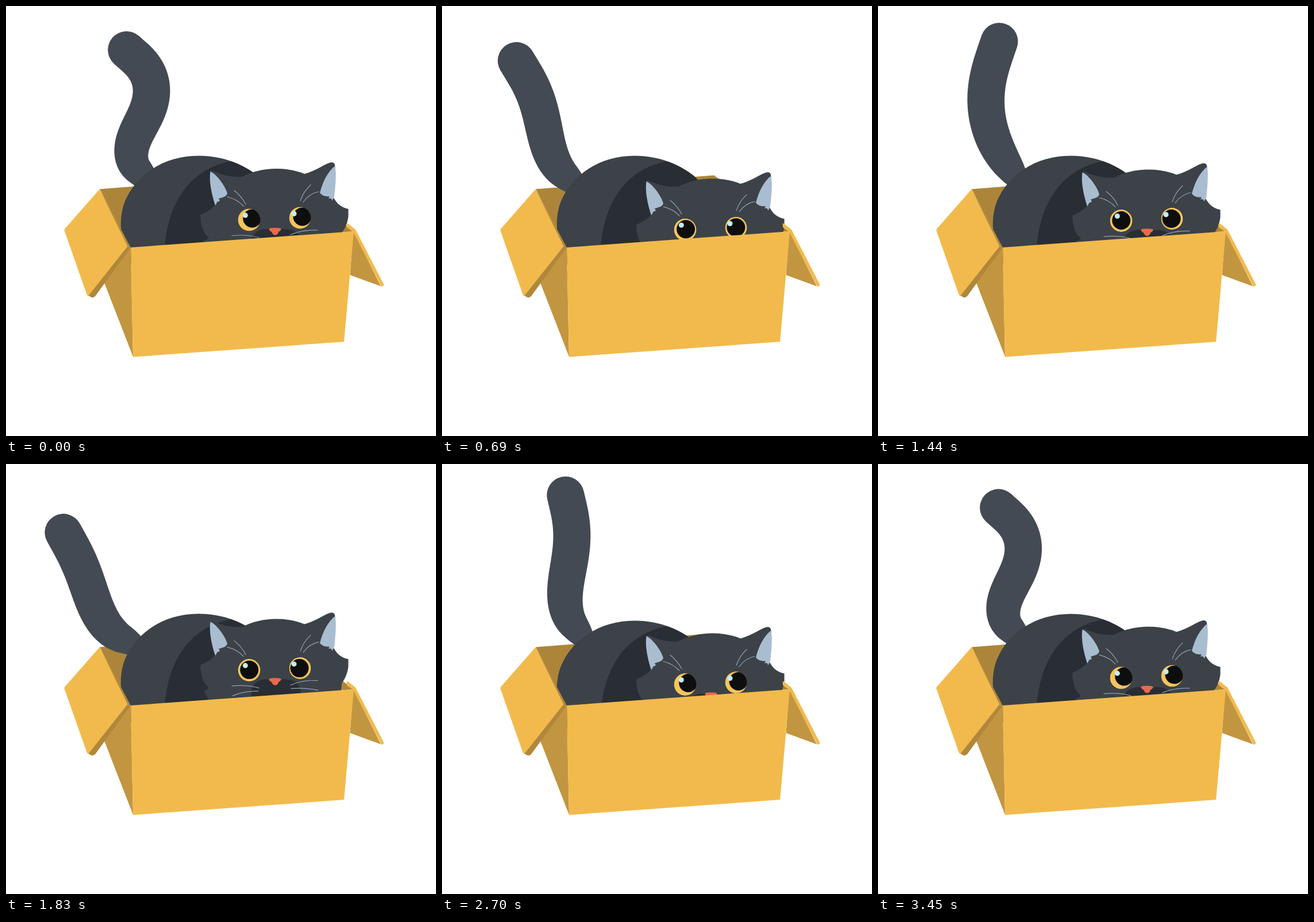
Recreate the animation shown at these times as an HTML page. Size 748 by 748 pixels, loop 3.48 s.

```html
<!DOCTYPE html>
<html lang="en">
<head>
<meta charset="utf-8">
<title>Cat in a box</title>
<style>
html, body { margin: 0; width: 100%; height: 100%; overflow: hidden; background: #fff; }
svg { display: block; width: 100vw; height: 100vh; }
.line { fill: none; stroke: #8fa3b1; stroke-width: 1.2; stroke-linecap: round; }
.fur { fill: #3c4247; }
.dark { fill: #292d34; }
.card { fill: #f2ba4c; }
.shade { fill: #c29540; }
.ear { fill: #a9bdd1; }
</style>
</head>
<body>
<svg viewBox="0 0 748 748">
  <defs>
    <path id="torso" d="M212 450C198 405 194 362 211 331C233 288 280 260.500 335 260.500C380 260.500 416 277 441 298L480 345V450Z"/>
    <clipPath id="inTorso"><use href="#torso"/></clipPath>
    <clipPath id="inEyeL"><circle cx="423" cy="372" r="19.500"/></clipPath>
    <clipPath id="inEyeR"><circle cx="511.500" cy="368.500" r="19"/></clipPath>
  </defs>

  <path fill="#ad853a" d="M163 318.500L473 294.500L605 392L217 421Z"/>
  <path id="tail" fill="#444a53"/>

  <g id="body">
    <use href="#torso" class="fur"/>
    <path class="dark" clip-path="url(#inTorso)" d="M275 440C276 354 312 285 392 270L500 260V440Z"/>
  </g>

  <g id="head">
    <path class="fur" d="M355 290Q355 285 360 287C378 295 393 298 411 297C428 288 448 283 470 283C489 283 505 286 519 292C536 288 549 278 562 273Q570 270 572 276C575 293 572 309 568 329C574 343 582 350 595.500 353V366C594 378 590 387 584 395L580 440H362Q350 420 344 408Q350 407 353 403C343 396 338 380 338 363Q354 357 364 346C358 330 354 308 355 290Z"/>
    <path class="ear" d="M355.500 288C364 291 381 311 385 326C383 332 377 333 370 335Q374 341 368 340L364 347C357 325 353 304 355.500 288Z"/>
    <path class="ear" d="M572.500 278C575 295 573 314 571 332L567 339Q567 333 561 335L563 331C555 332 549 329 546 325C551 305 560 288 572.500 278Z"/>
    <path class="line" d="M397 321Q410 331 417 345M385 332Q402 336 413 348M530 311Q517 323 512 339M544 323Q528 326 517 341"/>
    <path class="dark" d="M427 412C425 398 438 388 453 388Q461 388 468 391Q476 388 485 388C502 388 514 397 512 412V435H427Z"/>
    <path fill="#e9694b" d="M459 386.500Q468 385 477 386.500Q480 388 477 391L474 393Q473 398 468 398.500Q464 398 462 393L459 391Q456 388 459 386.500Z"/>
    <path class="line" d="M393 399.500Q420 397 440 403M394 416.500Q415 408 439 408.500M495 398Q515 389 542 390M496 404Q520 402 543 407"/>
    <g clip-path="url(#inEyeL)">
      <circle cx="423" cy="372" r="19.500" fill="#f6c45c"/>
      <circle class="pupil" cx="423.200" cy="371.500" r="16" fill="#0e0e0f"/>
    </g>
    <g clip-path="url(#inEyeR)">
      <circle cx="511.500" cy="368.500" r="19" fill="#f6c45c"/>
      <circle class="pupil" cx="510.500" cy="368.500" r="16" fill="#0e0e0f"/>
    </g>
    <g fill="#c3eef6">
      <circle cx="416.300" cy="364" r="4.500"/>
      <circle cx="501" cy="361.300" r="4.500"/>
    </g>
  </g>

  <path class="shade" d="M604 391L652 487.500L598.500 468Z"/>
  <path class="card" d="M592.500 379Q594 377 597 380L608 389L657 484Q658 488 653 488L604 393L593 385Z"/>
  <path class="shade" d="M217 420L200 410L165 466L221 610Z"/>
  <path class="card" d="M217 420L605 392L588 584L221 610.500Z"/>
  <path fill="#b0873b" d="M163 318.500L217 420L155 505Q152 508 148 506.500L142 503L205 410Z"/>
  <path class="card" d="M163 318.500L102 388Q101 390 102 392L140 500Q141 503 143 504.500L211.500 418Z"/>
</svg>
<script>
const LOOP = 3480, STEP = 30;
const $ = id => document.getElementById(id);
const pupils = document.querySelectorAll('.pupil');

// Tail poses in degrees: lean, curl, bend, wave (polynomial orders 0 to 3)
const curled = [13.6, 5.3, 15.9, -7.6];
const curledFar = [11.2, 5.3, 15.8, -8.1];
const left = [35.8, -6.4, 7, -2.7];
const leftLow = [33.9, -6.8, 7, -2.8];
const rising = [12.3, 3.3, 5.8, -3.5];
const hooked = [5.1, -13.9, 1.4, 1];

// Keys: time, value, optional time bend of the segment leading to it
const tailKeys = [[0, curled], [480, left], [960, rising], [1440, hooked],
  [1920, leftLow, .75], [2400, curledFar, 1.5], [3000, hooked], [LOOP, curled, .8]];
const headKeys = [[0, [0]], [960, [21]], [1920, [-14], .9], [2880, [13], .8], [LOOP, [0]]];
const bodyKeys = [[0, [0]], [1800, [0]], [3000, [14]], [LOOP, [0]]];
const gazeKeys = [[0, [5]], [960, [0]], [1920, [0]], [2480, [5]], [LOOP, [5]]];

function track(keys, t) {
  const i = keys.findIndex(k => k[0] > t);
  const [t0, a] = keys[i - 1], [t1, b, bend = 1] = keys[i];
  const u = Math.pow((t - t0) / (t1 - t0), bend);
  const p = .5 - .5 * Math.cos(Math.PI * u);
  return a.map((v, n) => v + (b[n] - v) * p);
}

// Walks from the root to the tip along the heading, which is cubic in u
function tailPath([lean, curl, bend, wave]) {
  const N = 60, sides = [[], []];
  const stretch = .99 + .003 * (bend - lean);
  let x = 259 - .8 * lean + .65 * curl, y = 304 + .4 * lean, r;
  for (let i = 0; i <= N; i++) {
    const u = i / N, v = Math.max(-2, Math.min(2, 5 * u - 2.5));
    const deg = lean + curl * v + bend * (v * v - 2) + wave * (5 * v ** 3 - 17 * v) / 6;
    const sin = Math.sin(deg * Math.PI / 180), cos = Math.cos(deg * Math.PI / 180);
    r = 32.5 - 15 * Math.exp(-8 * u);
    sides[0].push(`${x - cos * r} ${y + sin * r}`);
    sides[1].unshift(`${x + cos * r} ${y - sin * r}`);
    const ds = stretch * (333 - 133 * u) / N;
    x -= sin * ds;
    y -= cos * ds;
  }
  return `M${sides[0].join('L')}A${r} ${r} 0 0 1 ${sides[1].join('L')}L275 340Z`;
}

function draw(t) {
  const shift = (el, x, y) => el.setAttribute('transform', `translate(${x} ${y})`);
  const gaze = track(gazeKeys, t)[0];
  $('tail').setAttribute('d', tailPath(track(tailKeys, t)));
  shift($('body'), 0, track(bodyKeys, t)[0]);
  shift($('head'), 0, track(headKeys, t)[0]);
  pupils.forEach(p => shift(p, gaze, -gaze * .4));
}

function frame() {
  draw(Math.floor(performance.now() % LOOP / STEP) * STEP);
  requestAnimationFrame(frame);
}
frame();
</script>
</body>
</html>
```
